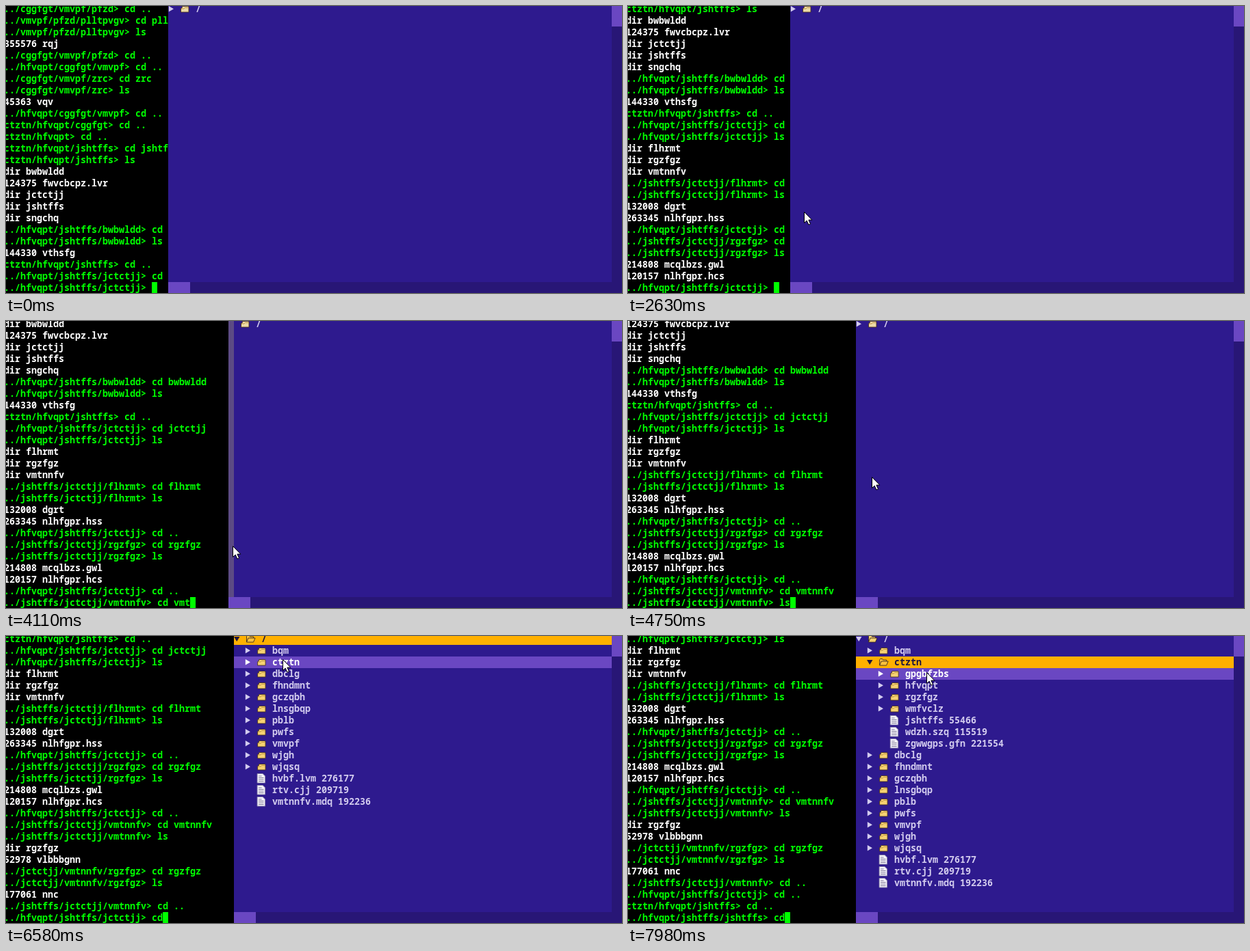
Animation of 900x420 px, one loop 8000 ms. Source, as an HTML page:

```html
<!DOCTYPE html>
<html lang="en">
<head>
<meta charset="utf-8">
<title>Terminal and file tree</title>
<style>
html, body { margin: 0; width: 100%; height: 100%; overflow: hidden; background: #000; }
svg { display: block; width: 900px; height: 420px; }
text { font: 600 13.333px "Noto Sans Mono", "DejaVu Sans Mono", monospace; white-space: pre; }
</style>
</head>
<body>
<svg viewBox="0 0 900 420">
  <rect width="900" height="420" fill="#000"/>
  <g id="term"></g>
  <rect id="caret" y="404" width="8" height="16" fill="#0f0"/>
  <g id="panel">
    <rect width="700" height="420" fill="#2e1a8e"/>
    <g id="tree"></g>
    <rect id="split" width="8" height="404" fill="#5c4b84"/>
    <rect y="404" width="700" height="16" fill="#281676"/>
    <rect y="404" width="32" height="16" fill="#6a47c2"/>
  </g>
  <rect x="885" width="15" height="420" fill="#281676"/>
  <rect x="885" width="15" height="30" fill="#6a47c2"/>
  <path id="mouse" d="M0 0V16L3.7 12.6L6.4 18.6L9 17.4L6.4 11.6H11.3Z" fill="#fff" stroke="#000"/>
</svg>
<script>
const LOOP = 8000, ROW = 17, CHAR = 8, LEFT = -3, ROWS = 25;
const $ = id => document.getElementById(id);

const log = `../cggfgt/vmvpf/pfzd> cd ..
../vmvpf/pfzd/plltpvgv> cd plltpvgv
../vmvpf/pfzd/plltpvgv> ls
355576 rqj
../cggfgt/vmvpf/pfzd> cd ..
../hfvqpt/cggfgt/vmvpf> cd ..
../cggfgt/vmvpf/zrc> cd zrc
../cggfgt/vmvpf/zrc> ls
45363 vqv
../hfvqpt/cggfgt/vmvpf> cd ..
ctztn/hfvqpt/cggfgt> cd ..
ctztn/hfvqpt> cd ..
ctztn/hfvqpt/jshtffs> cd jshtffs
ctztn/hfvqpt/jshtffs> ls
dir bwbwldd
124375 fwvcbcpz.lvr
dir jctctjj
dir jshtffs
dir sngchq
../hfvqpt/jshtffs/bwbwldd> cd bwbwldd
../hfvqpt/jshtffs/bwbwldd> ls
144330 vthsfg
ctztn/hfvqpt/jshtffs> cd ..
../hfvqpt/jshtffs/jctctjj> cd jctctjj
../hfvqpt/jshtffs/jctctjj> ls
dir flhrmt
dir rgzfgz
dir vmtnnfv
../jshtffs/jctctjj/flhrmt> cd flhrmt
../jshtffs/jctctjj/flhrmt> ls
132008 dgrt
263345 nlhfgpr.hss
../hfvqpt/jshtffs/jctctjj> cd ..
../jshtffs/jctctjj/rgzfgz> cd rgzfgz
../jshtffs/jctctjj/rgzfgz> ls
214808 mcqlbzs.gwl
120157 nlhfgpr.hcs
../hfvqpt/jshtffs/jctctjj> cd ..
../jshtffs/jctctjj/vmtnnfv> cd vmtnnfv
../jshtffs/jctctjj/vmtnnfv> ls
dir rgzfgz
52978 vlbbbgnn
../jctctjj/vmtnnfv/rgzfgz> cd rgzfgz
../jctctjj/vmtnnfv/rgzfgz> ls
177061 nnc
../jshtffs/jctctjj/vmtnnfv> cd ..
../hfvqpt/jshtffs/jctctjj> cd ..
ctztn/hfvqpt/jshtffs> cd ..
../hfvqpt/jshtffs/jshtffs> cd jshtffs`.split("\n");

// [time, keys pressed so far]
const typing = [[0, 0], [840, 13], [1380, 19], [1590, 22], [1840, 25], [2450, 32], [2630, 35],
  [2730, 36], [3020, 38], [3400, 41], [4100, 47], [4980, 57], [5040, 58], [5390, 63], [5660, 64],
  [6270, 74], [6450, 75], [6570, 76], [6760, 77], [7970, 88], [8090, 89]];

// [time, x, y] of the pointer tip
const pointer = [[0, 700, 440], [30, 684, 418], [120, 650, 407], [230, 591, 389], [480, 412, 344],
  [770, 253, 301], [840, 253, 301], [1380, 241, 296], [1590, 241, 296], [2250, 257, 301],
  [2740, 257, 301], [3020, 243, 312], [3400, 243, 312], [4110, 331, 329], [4300, 339, 332],
  [4400, 339, 332], [4700, 352, 250], [4880, 367, 174], [5010, 375, 113], [5170, 361, 46],
  [5260, 361, 29], [5390, 362, 10], [5660, 362, 10], [5900, 374, 19], [6280, 404, 34],
  [6760, 404, 34], [7540, 421, 40], [7610, 421, 40], [7970, 436, 53]];

const DRAG = [3400, 4300], OPEN_ROOT = 5660, OPEN_DIR = 7610;

const dirs = (depth, names) => names.split(" ").map(name => ({ depth, name, dir: true }));
const files = (depth, names) => names.split(", ").map(name => ({ depth, name }));
const root = dirs(0, "/");
const top1 = dirs(1, "bqm ctztn dbclg fhndmnt gczqbh lnsgbqp pblb pwfs vmvpf wjgh wjqsq")
  .concat(files(1, "hvbf.lvm 276177, rtv.cjj 209719, vmtnnfv.mdq 192236"));
const inner = dirs(2, "gpgbfzbs hfvqpt rgzfgz wmfvclz")
  .concat(files(2, "jshtffs 55466, wdzh.szq 115519, zgwwgps.gfn 221554"));

function at(keys, t, col = 1) {
  const i = keys.findIndex(k => k[0] > t);
  if (i < 0) return keys[keys.length - 1][col];
  const a = keys[i - 1], b = keys[i];
  return a[col] + (b[col] - a[col]) * (t - a[0]) / (b[0] - a[0]);
}

function put(el, html) {
  if (el.last !== html) el.innerHTML = el.last = html;
}

const label = (x, y, fill, s) =>
  `<text x="${x}" y="${y}" fill="${fill}">${s.replace(/>/g, "&gt;")}</text>`;

function drawTerm(t) {
  let left = Math.floor(at(typing, t) + 1e-6), cur = ROWS - 1;
  for (; cur < log.length - 1; cur++) {
    const cmd = log[cur].split("> ")[1];
    if (!cmd) continue;
    if (left <= cmd.length) break;
    left -= cmd.length + 1;
  }
  const first = cur - ROWS + 1;
  const shown = log.slice(first, cur + 1);
  const line = log[cur].slice(0, log[cur].indexOf("> ") + 2 + left);
  shown[ROWS - 1] = line;
  put($("term"), shown.map((s, i) =>
    label(LEFT, 9 + i * ROW, s.includes(">") ? "#0f0" : "#fff", s)).join(""));
  $("caret").setAttribute("x", LEFT + line.length * CHAR);
}

const shape = (x, y, d, fill, stroke = "none") =>
  `<path transform="translate(${x} ${y})" d="${d}" fill="${fill}" stroke="${stroke}" stroke-width=".9"/>`;

function icon(item, x, y, fill) {
  if (!item.dir)
    return shape(x, y + 1, "M.5 .5H8.5L12 4V14H.5Z", "#f4f2fa", "#8a84a8") +
      shape(x, y + 1, "M2.5 4H7M2.5 6.5H10M2.5 9H10M2.5 11.5H10", "none", "#77718f");
  if (item.open)
    return shape(x, y + 3, "M.5 10V1.5L1.5 .5H4.5L5.5 2H10.5V4", fill, "#3a2a20") +
      shape(x, y + 3, "M.5 10L3 4H13L10.5 10Z", fill, "#3a2a20");
  return shape(x, y + 4, "M.5 9V3.5L2 3L2.5 .5H11.5L12 2V9Z", fill, "#4a3320") +
    shape(x, y + 4, "M1 4H5L6.5 2.5H11.5", "none", "#b98f3a");
}

function drawTree(t, px, mx, my) {
  let items = root, picked = -1;
  if (t >= OPEN_ROOT) {
    const rest = top1.slice(), dirOpen = t >= OPEN_DIR;
    if (dirOpen) rest.splice(1, 1, { ...top1[1], open: true }, ...inner);
    items = [{ ...root[0], open: true }, ...rest];
    picked = dirOpen ? 2 : 0;
  }
  const hover = mx > px ? Math.floor((my + 4) / ROW) : -1;
  put($("tree"), items.map((item, i) => {
    const y = i * ROW - 4, x = item.depth * 16;
    const on = i === picked, over = i === hover;
    const ink = on ? "#1c1440" : over ? "#fff" : "#d2cbee";
    const gold = on ? "#ffc23c" : items === root && !over ? "#ecdaa6" : "#f6d272";
    const band = on || over
      ? `<rect y="${y}" width="700" height="${ROW}" fill="${on ? "#ffb000" : "#6a47c2"}"/>` : "";
    const arrow = !item.dir ? "" : item.open
      ? shape(x, y + 5, "M0 0H8.5L4.2 7Z", ink) : shape(x, y + 4, "M.8 0L8 4.2L.8 8.4Z", ink);
    return band + arrow + icon(item, x + 18 - (item.dir ? 0 : 0.5) + x / 160, y, gold) +
      label(x + 40, y + 13, ink, item.name);
  }).join(""));
}

function draw(t) {
  const mx = at(pointer, t, 1), my = at(pointer, t, 2);
  const dragging = t >= DRAG[0] && t < DRAG[1];
  const px = t < DRAG[0] ? 237 : dragging ? Math.round(mx) - 6 : 333;
  drawTerm(t);
  drawTree(t, px, mx, my);
  $("panel").setAttribute("transform", `translate(${px})`);
  $("split").setAttribute("visibility", dragging ? "visible" : "hidden");
  $("mouse").setAttribute("transform", `translate(${Math.round(mx) + 0.5} ${Math.round(my) + 0.5})`);
}

const start = performance.now();
function tick() {
  draw((performance.now() - start) % LOOP);
  requestAnimationFrame(tick);
}
tick();
</script>
</body>
</html>
```
